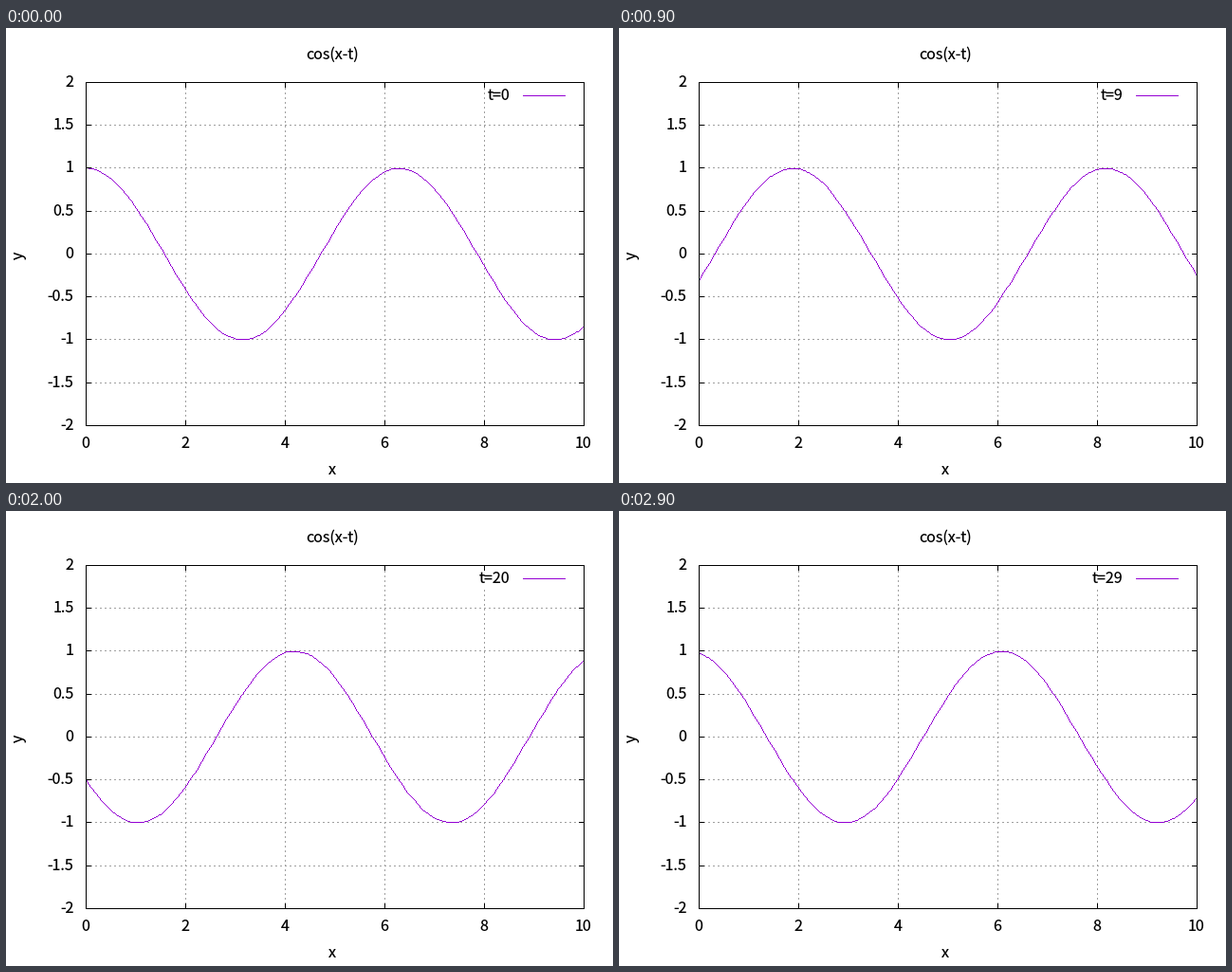
Recreate the animation shown at these times as a matplotlib script. Size 640x480 px, loop 3000 ms.

```python
import numpy as np
import matplotlib.pyplot as plt
from matplotlib.animation import FuncAnimation
from matplotlib.patches import Rectangle

W, H, DPI = 640, 480, 100
FRAMES, INTERVAL = 30, 100
LEFT, RIGHT, TOP, BOTTOM = 84, 609, 57, 419
PX = 72 / DPI
PURPLE, GRID = "#9400d3", "#a0a0a0"

plt.rcParams.update({
    "font.family": "Noto Sans CJK JP",
    "font.size": 16 * PX,
    "text.hinting": "native",
    "path.simplify": False,
})

fig = plt.figure(figsize=(W / DPI, H / DPI), dpi=DPI, facecolor="white")
ax = fig.add_axes([0, 0, 1, 1])
ax.axis("off")


def to_px(x, y):
    """Data coordinates to whole pixels on the stage."""
    px = LEFT + np.asarray(x) * (RIGHT - LEFT) / 10
    py = BOTTOM - (np.asarray(y) + 2) * (BOTTOM - TOP) / 4
    return np.floor(px + 0.5).astype(int), np.ceil(py - 0.5).astype(int)


def line(xs, ys, color="black", z=4, **kw):
    """One-pixel line through pixel centres."""
    ax.plot(np.add(xs, 0.5), np.add(ys, 0.5), color=color, lw=PX,
            aa=False, zorder=z, snap=False, **kw)


def dotted(xs, ys):
    line(xs, ys, GRID, 1, dashes=(2, 3), dash_capstyle="butt")


def label(x, y, s, ha="center", **kw):
    return ax.text(x, y, s, ha=ha, va="baseline", zorder=5, **kw)


def trace(px, py):
    """Pixels of a one-pixel polyline without smoothing."""
    parts = []
    for x0, y0, x1, y1 in zip(px, py, px[1:], py[1:]):
        n = max(abs(x1 - x0), abs(y1 - y0)) + 1
        parts.append(np.rint([np.linspace(x0, x1, n), np.linspace(y0, y1, n)]))
    return np.hstack(parts).astype(int)


# The curve is plotted pixel by pixel on a transparent layer.
layer = ax.imshow(np.zeros((H, W, 4), np.uint8), extent=(0, W, H, 0),
                  aspect="auto", interpolation="nearest", zorder=3)
ax.set_xlim(0, W)
ax.set_ylim(H, 0)
ax.set_autoscale_on(False)

for v in range(0, 11, 2):
    x = int(to_px(v, 0)[0])
    if LEFT < x < RIGHT:
        dotted([x, x], [BOTTOM + 0.5, TOP])
    line([x, x], [BOTTOM, BOTTOM - 5])
    line([x, x], [TOP, TOP + 5])
    label(x, 443, str(v))

for v in np.arange(-2, 2.5, 0.5):
    y = int(to_px(0, v)[1])
    if TOP < y < BOTTOM:
        dotted([LEFT - 0.5, RIGHT], [y, y])
    line([LEFT, LEFT + 5], [y, y])
    line([RIGHT, RIGHT - 5], [y, y])
    label(71.5, y + 5, f"{v:g}", "right")

line([LEFT, RIGHT, RIGHT, LEFT, LEFT], [TOP, TOP, BOTTOM, BOTTOM, TOP],
     solid_joinstyle="miter", solid_capstyle="projecting")

label(344.5, 33, "cos(x-t)")
label(343.5, 471, "x")
label(18, 239.5, "y", rotation=90, rotation_mode="anchor")

# The wider two-digit key hides part of the grid line beside it.
key_gap = ax.add_patch(Rectangle((499, 63), 10, 18, fc="white", ec="none",
                                 zorder=2))
key = label(531.5, 76, "", "right")
line([545, 589], [71, 71], PURPLE)

xs = np.linspace(0, 10, 100)
ink = [int(PURPLE[k:k + 2], 16) for k in (1, 3, 5)] + [255]


def draw(i):
    px, py = trace(*to_px(xs, np.cos(xs - 2 * np.pi * i / FRAMES)))
    pixels = np.zeros((H, W, 4), np.uint8)
    pixels[py, px] = ink
    layer.set_data(pixels)
    key.set_text(f"t={i}")
    key_gap.set_visible(i >= 10)
    return layer, key, key_gap


anim = FuncAnimation(fig, draw, frames=FRAMES, interval=INTERVAL, repeat=True)
plt.show()
```
